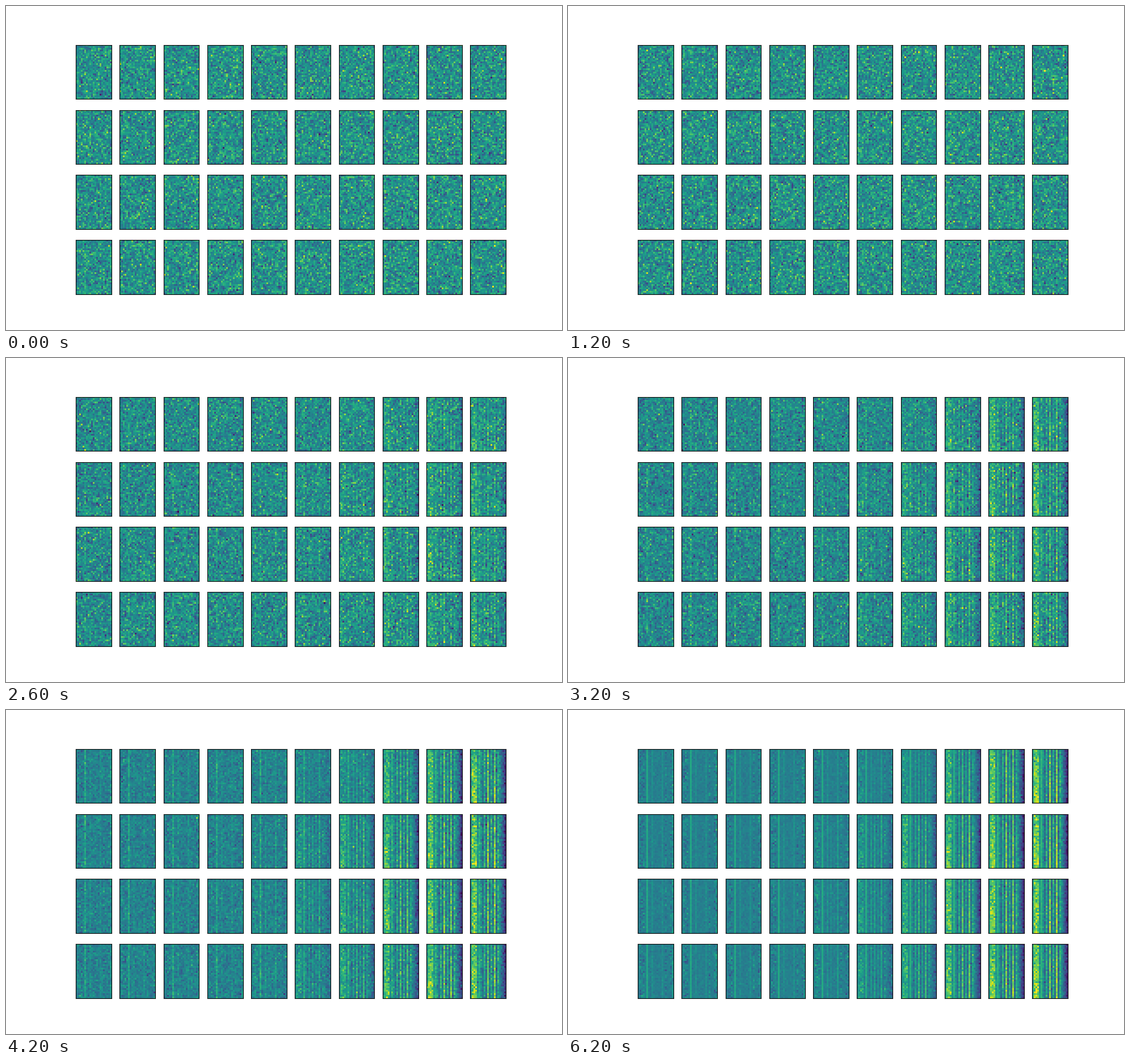
These frames come from a looping animation (980x572 px, 6400 ms). A matplotlib script:

```python
import numpy as np
import matplotlib.pyplot as plt
from matplotlib.animation import FuncAnimation

FRAMES, INTERVAL = 32, 200
ROWS, COLS = 4, 10
H, W = 32, 21
MEAN, SIGMA = 0.51, 0.125

rng = np.random.default_rng(11)


def smoothstep(t):
    t = np.clip(t, 0, 1)
    return t * t * (3 - 2 * t)


def calm_profile():
    """Level and spread of each cell column in the left panels."""
    level, spread = np.full(W, .43), np.full(W, .025)
    level[8::6] = .49
    level[5] = .60
    spread[1:4] = spread[16::3] = spread[-1] = .07
    spread[5] = .01
    return level, spread


def strong_profile():
    """Bright left band, alternating stripes, dark right edge."""
    level, spread = np.full(W, .52), np.full(W, .06)
    level[1:4] = .78
    level[5] = .65
    level[7:16:2] = .36
    level[8:17:4] = .62
    level[10:17:4] = .80
    level[17:] = np.linspace(.48, .12, W - 17)
    spread[1:4] = .10
    spread[5] = .02
    return level, spread


def clean_panels():
    column = smoothstep((np.arange(COLS) - 2.5) / (COLS - 3.5))
    k = np.tile(column, (ROWS, 1))
    k[0] **= 2
    k = k[:, :, None, None]
    (calm, calm_spread), (strong, strong_spread) = calm_profile(), strong_profile()
    level = calm + k * (strong - calm)
    spread = calm_spread + k * (strong_spread - calm_spread)
    slope = np.linspace(-.06, .06, H)[:, None] * k * (strong > .7)
    return level + slope + spread * rng.standard_normal((ROWS, COLS, H, W))


def denoise(keep=.75):
    """Blend from slowly changing noise to the clean panels."""
    clean = clean_panels()
    noise = rng.standard_normal(clean.shape)
    states = []
    for n in range(FRAMES - 1):
        signal = smoothstep(n / 25) ** 1.5
        sigma = SIGMA * max(np.sqrt(1 - signal ** 2), .04 * (1 - n / FRAMES))
        states.append(MEAN + signal * (clean - MEAN) + sigma * noise)
        fresh = rng.standard_normal(clean.shape)
        noise = keep * noise + np.sqrt(1 - keep ** 2) * fresh
    # The last step only touches two cell columns of the rightmost panels.
    last = states[-1].copy()
    last[:, -1, :, 2:4] += .002 * noise[:, -1, :, 2:4]
    return states + [last]


states = denoise()

fig, axes = plt.subplots(ROWS, COLS, figsize=(9.8, 5.72), dpi=100)
fig.subplots_adjust(left=.1249, right=.8999)
images = []
for ax, panel in zip(axes.flat, states[0].reshape(-1, H, W)):
    images.append(ax.imshow(panel, vmin=0, vmax=1, cmap="viridis",
                            interpolation="nearest"))
    ax.set_xticks([])
    ax.set_yticks([])


def update(n):
    for image, panel in zip(images, states[n].reshape(-1, H, W)):
        image.set_data(panel)
    return images


anim = FuncAnimation(fig, update, frames=FRAMES, interval=INTERVAL,
                     repeat=True, repeat_delay=0)
plt.show()
```
